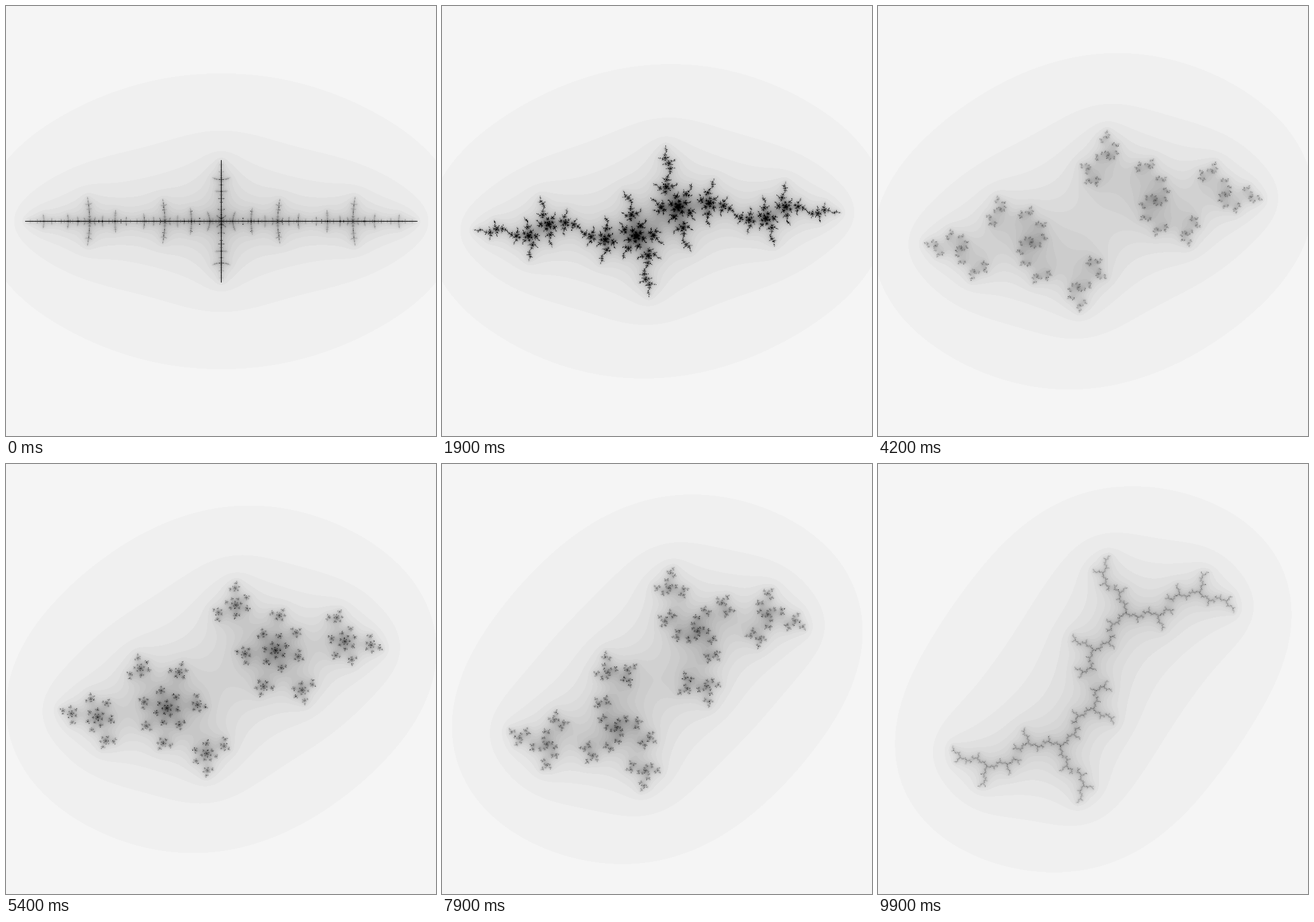
An HTML page with a canvas that plays this animation: 720 by 720 pixels, repeating every 10000 ms.

```html
<!DOCTYPE html>
<html lang="en">
<head>
<meta charset="utf-8">
<title>Julia set drift</title>
<style>
  html, body { margin: 0; width: 100%; height: 100%; overflow: hidden; background: #f5f5f5; }
  canvas { display: block; width: 720px; height: 720px; }
</style>
</head>
<body>
<canvas id="stage" width="720" height="720"></canvas>
<script>
const SIZE = 720, MID = SIZE / 2, SCALE = 180;
const MAX_ITER = 50, RADIUS_SQ = 100;
const STEPS = 100, STEP_MS = 100;

const ctx = document.getElementById('stage').getContext('2d');
const image = ctx.createImageData(SIZE, SIZE);
const pixels = new Uint32Array(image.data.buffer);

// Opaque grey per escape count, from white down to black
const shades = Uint32Array.from({ length: MAX_ITER + 1 }, (_, n) => {
  const grey = Math.round(255 * (1 - n / MAX_ITER));
  return 0xff000000 | grey << 16 | grey << 8 | grey;
});

function escapeCount(x, y, cx, cy) {
  for (let n = 0; n < MAX_ITER; n++) {
    const xx = x * x, yy = y * y;
    if (xx + yy > RADIUS_SQ) return n;
    y = 2 * x * y + cy;
    x = xx - yy + cx;
  }
  return MAX_ITER;
}

function draw(step) {
  const cx = -1.5 + 1.5 * step / STEPS;
  const cy = step / STEPS;
  for (let row = 0; row <= MID; row++) {
    const y = (row - MID) / SCALE;
    for (let col = 0; col < SIZE; col++) {
      const shade = shades[escapeCount((col - MID) / SCALE, y, cx, cy)];
      pixels[row * SIZE + col] = shade;
      // The set is symmetric under z -> -z
      if (row && col) pixels[(SIZE - row) * SIZE + SIZE - col] = shade;
    }
    // The first column has no mirror partner, so the lower half needs its own
    if (row) {
      pixels[(SIZE - row) * SIZE] = shades[escapeCount(-MID / SCALE, -y, cx, cy)];
    }
  }
  ctx.putImageData(image, 0, 0);
}

const start = performance.now();
let shown = -1;

function tick() {
  const step = Math.floor((performance.now() - start) / STEP_MS) % STEPS;
  if (step !== shown) draw(shown = step);
  requestAnimationFrame(tick);
}
tick();
</script>
</body>
</html>
```
